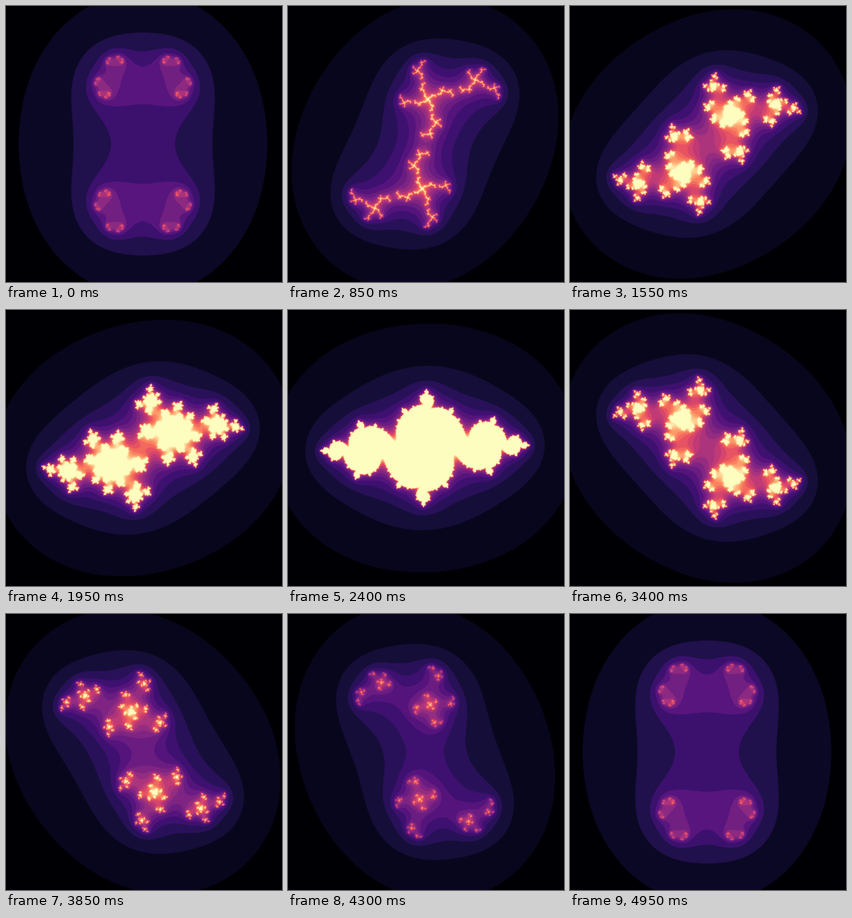
Recreate the animation shown at these times as an HTML page with a canvas. Size 540 px wide and 540 px high, loop 5000 ms.

```html
<!DOCTYPE html>
<html>
<head>
<meta charset="utf-8">
<style>
  html, body { margin: 0; height: 100%; overflow: hidden; background: #000; }
  canvas { display: block; }
</style>
</head>
<body>
<canvas id="stage" width="540" height="540"></canvas>
<script>
const SIZE = 540, GRID = 800, LIMIT = 20, RADIUS = 0.7885;
const FRAMES = 100, FRAME_MS = 50;
const STEP = 135.75 * 4 / (GRID - 1);   // stage pixels per grid cell
const CENTER_X = 268, CENTER_Y = 270;

const ctx = document.getElementById('stage').getContext('2d');
const image = ctx.createImageData(SIZE, SIZE);
const pixels = new Uint32Array(image.data.buffer);
const counts = new Uint8Array(GRID * GRID);
const rows = new Float32Array(GRID * SIZE);

// Magma colour map, interpolated from evenly spaced stops
const stops = ['000004', '090720', '1a1042', '311165', '4a1079', '621980',
  '792282', '912b81', 'aa337d', 'c23b75', 'd9466b', 'ec5860',
  'f7725c', 'fc8e64', 'feaa74', 'fec68a', 'fde2a3', 'fcfdbf'].map(hex => parseInt(hex, 16));
const magma = Uint32Array.from({ length: 256 }, (_, i) => {
  const k = Math.min(Math.floor(i / 15), stops.length - 2), f = i / 15 - k;
  const channel = s => Math.round((stops[k] >> s & 255) * (1 - f) + (stops[k + 1] >> s & 255) * f);
  return (255 << 24 | channel(0) << 16 | channel(8) << 8 | channel(16)) >>> 0;
});

function bspline(x) {
  x = Math.abs(x);
  if (x >= 2) return 0;
  return x < 1 ? 2 / 3 - x * x + x * x * x / 2 : (2 - x) ** 3 / 6;
}

// Filter taps that resample the grid to the stage along one axis
const TAPS = 6;
function makeTaps(center) {
  const index = new Int32Array(SIZE * TAPS), weight = new Float32Array(SIZE * TAPS);
  for (let p = 0; p < SIZE; p++) {
    const g = (p + 0.5 - center) / STEP + (GRID - 1) / 2;
    const first = Math.floor(g) - TAPS / 2 + 1;
    let sum = 0;
    for (let t = 0; t < TAPS; t++) {
      index[p * TAPS + t] = Math.max(0, Math.min(GRID - 1, first + t));
      sum += weight[p * TAPS + t] = bspline((first + t - g) * STEP);
    }
    for (let t = 0; t < TAPS; t++) weight[p * TAPS + t] /= sum;
  }
  return { index, weight };
}
const tapsX = makeTaps(CENTER_X), tapsY = makeTaps(CENTER_Y);

function escapeTime(x, y, cx, cy) {
  for (let i = 0; i < LIMIT; i++) {
    const xx = x * x - y * y + cx;
    y = 2 * x * y + cy;
    x = xx;
    if (x * x + y * y > 16) return i;
  }
  return LIMIT - 1;
}

// Fills the grid, using the symmetry z -> -z, and returns the highest count
function fillCounts(cx, cy) {
  const last = GRID * GRID - 1, cell = 4 / (GRID - 1);
  let max = 1;
  for (let j = 0, n = 0; j < GRID / 2; j++) {
    for (let i = 0; i < GRID; i++, n++) {
      const count = escapeTime(i * cell - 2, j * cell - 2, cx, cy);
      counts[n] = counts[last - n] = count;
      if (count > max) max = count;
    }
  }
  return max;
}

function draw(frame) {
  const angle = 2 * Math.PI * frame / (FRAMES - 1);
  const max = fillCounts(RADIUS * Math.cos(angle), RADIUS * Math.sin(angle));

  for (let j = 0; j < GRID; j++) {
    for (let x = 0; x < SIZE; x++) {
      let sum = 0;
      for (let t = x * TAPS, end = t + TAPS; t < end; t++)
        sum += tapsX.weight[t] * counts[j * GRID + tapsX.index[t]];
      rows[j * SIZE + x] = sum;
    }
  }
  for (let y = 0; y < SIZE; y++) {
    for (let x = 0; x < SIZE; x++) {
      let sum = 0;
      for (let t = y * TAPS, end = t + TAPS; t < end; t++)
        sum += tapsY.weight[t] * rows[tapsY.index[t] * SIZE + x];
      pixels[y * SIZE + x] = magma[Math.min(255, Math.floor(sum / max * 256 + 1e-3))];
    }
  }
  ctx.putImageData(image, 0, 0);
}

let shown = -1;
function tick() {
  const frame = Math.floor(performance.now() / FRAME_MS) % FRAMES;
  if (frame !== shown) draw(shown = frame);
  requestAnimationFrame(tick);
}
tick();
</script>
</body>
</html>
```
